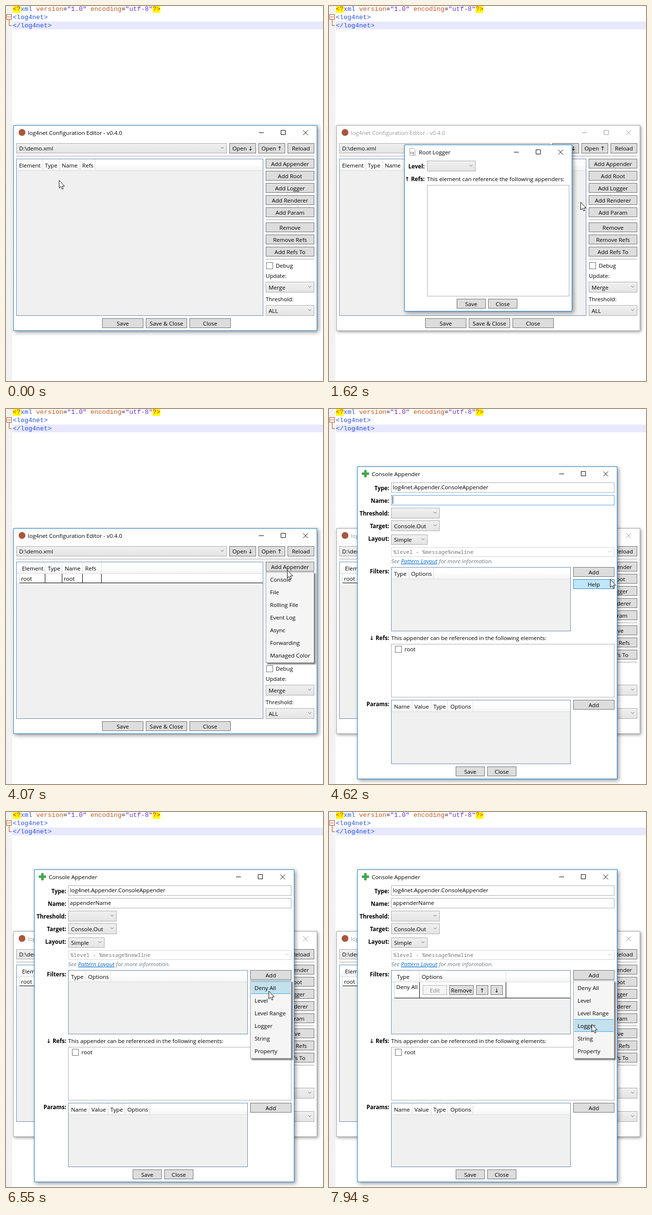
Animation, 653 px wide and 771 px high, one loop 8 s. Source, as an HTML page:

```html
<!DOCTYPE html>
<html lang="en">
<head>
<meta charset="utf-8">
<title>log4net Configuration Editor</title>
<style>
  html, body { margin: 0; width: 100%; height: 100%; overflow: hidden; background: #fff; }
  svg { display: block; width: 100vw; height: 100vh; }
  text { font: 11.6px 'Open Sans', 'Noto Sans', 'DejaVu Sans', sans-serif; fill: #000; white-space: pre; }
  .bold { font-weight: 700; text-anchor: end; }
  .mid { text-anchor: middle; }
  .code { font: 13.333px 'Liberation Mono', 'Courier New', monospace; }
  .mono { font: 11px 'Noto Sans Mono', 'DejaVu Sans Mono', monospace; fill: #7c7c7c; }
  .hint { font-style: italic; fill: #6c7b84; }
  .link { fill: #0066cc; text-decoration: underline; }
  .frame { fill: #fff; stroke: #1a7fc9; filter: drop-shadow(3px 3px 4px rgba(0,0,0,.42)); }
  .chrome { fill: none; stroke: #000; }
  .inactive > .frame { stroke: #a5a5a5; filter: drop-shadow(2px 2px 3px rgba(0,0,0,.4)); }
  .inactive > .chrome { stroke: #999; }
  .inactive > .title { fill: #999; }
  .btn rect { fill: #ddd; stroke: #707070; }
  .btn.hot rect { fill: #bee6fd; stroke: #3c7fb1; }
  .btn.off rect { fill: #f4f4f4; stroke: #adb2b5; }
  .btn.off text { fill: #838383; }
  .field { fill: #fff; stroke: #abadb3; }
  .field.focus { stroke: #569de5; }
  .menu { fill: #f5f5f5; stroke: #999; filter: drop-shadow(3px 3px 1px rgba(0,0,0,.5)); }
</style>
</head>
<body>
<svg id="stage" viewBox="0 0 653 771" preserveAspectRatio="none"></svg>
<script>
const BLACK = '#000';

// Drawing helpers
const fill = (x, y, w, h, color, extra = '') =>
  `<rect x="${x}" y="${y}" width="${w}" height="${h}" fill="${color}" ${extra}/>`;
const box = (x, y, w, h, attrs) =>
  `<rect x="${x + .5}" y="${y + .5}" width="${w - 1}" height="${h - 1}" ${attrs}/>`;
const text = (x, y, s, cls = '', extra = '') =>
  `<text x="${x}" y="${y}" class="${cls}" ${extra}>${s}</text>`;
const path = (d, color, extra = '') => `<path d="${d}" fill="none" stroke="${color}" ${extra}/>`;
const hline = (x1, x2, y, color = '#a0a0a0') => fill(x1, y, x2 - x1, 1, color);
const vline = (x, y1, y2, color) => fill(x, y1, 1, y2 - y1, color);
const group = (id, body, shown = true) =>
  `<g id="${id}"${shown ? '' : ' visibility="hidden"'}>${body}</g>`;

const button = (x, y, w, label, h = 20, cls = '') =>
  `<g class="btn ${cls}" data-box="${x},${y},${w},${h}">${box(x, y, w, h, '')}` +
  text(x + w / 2, y + 15, label, 'mid') + '</g>';

const chevron = (x, y, color = '#606060') => path(`M${x - 3} ${y - 1.5}l3 3l3 -3`, color);

const combo = (x, y, w, label = '', h = 22) =>
  box(x, y, w, h, 'fill="url(#combo)" stroke="#acacac"') +
  text(x + 6, y + 16 - (h < 22), label) + chevron(x + w - 9.5, y + h / 2 - 1);

const checkbox = (x, y, label) =>
  box(x, y, 14, 14, 'fill="#fff" stroke="#707070"') + text(x + 19.5, y + 11, label);

const gridBox = (x, y, w, h) =>
  box(x, y, w, h, 'fill="#f0f0f0" stroke="#688caf"') +
  fill(x + 1, y + 1, w - 2, 23, 'url(#head)') + hline(x + 1, x + w - 1, y + 24, '#dcdcdc');

// cols: [label, text x, separator x]
const header = (y, cols) => cols.map(([s, tx, sx]) =>
  text(tx, y + 18, s) + vline(sx, y + 1, y + 24, '#dedede')).join('');

const row = (x1, x2, y, h, lines) =>
  fill(x1, y, x2 - x1, h, '#fff') + hline(x1 + 6, x2, y + h - 1, BLACK) +
  vline(x1 + 5, y, y + h, '#d0d0d0') +
  lines.map(x => vline(x, y, y + h, BLACK)).join('');

const win = (id, x, y, w, h, title, icon, body) => {
  const r = x + w, cy = y + 15.5;
  return group(id,
    box(x, y, w, h, 'class="frame"') + icon + text(x + 30, y + 20, title, 'title') +
    `<path class="chrome" d="M${r - 120} ${cy}h10M${r - 74.5} ${cy - 5}h9v9h-9z` +
    `M${r - 29} ${cy - 5}l10 10m0 -10l-10 10"/>` + body);
};

const menu = (id, x, y, w, items) => group(id,
  box(x, y, w, items.length * 26 + 5, 'class="menu"') +
  group(id + 'Hot', fill(x + 2, y + 2, w - 4, 26, '#c3e0ee') +
    hline(x + 2, x + w - 2, y + 2, '#45a9d9') + hline(x + 2, x + w - 2, y + 27, '#45a9d9')) +
  items.map((s, i) => text(x + 9, y + 20 + 26 * i, s)).join(''), false);

const span = (s, color) => `<tspan fill="${color}">${s}</tspan>`;

// Scene
const defs = `<defs>
  <linearGradient id="combo" x2="0" y2="1"><stop stop-color="#f0f0f0"/><stop offset="1" stop-color="#e4e4e4"/></linearGradient>
  <linearGradient id="head" x2="0" y2="1"><stop offset=".4" stop-color="#fff"/><stop offset="1" stop-color="#f4f4f5"/></linearGradient>
  <pattern id="margin" width="2" height="2" patternUnits="userSpaceOnUse">
    <rect width="2" height="2" fill="#fff"/><path d="M0 0h1v1h1v1h-1v-1h-1z" fill="#e6e6e6"/></pattern>
</defs>`;

const blue = '#2450e0', orange = '#c4551c', purple = '#6a30d4', fold = '#b8501c';
const editor =
  fill(0, 0, 653, 771, '#fff') + fill(0, 0, 13, 771, 'url(#margin)') +
  fill(14, 32, 639, 16, '#e8e8ff') + fill(14, 0, 16, 14, '#ff0') + fill(302, 0, 16, 14, '#ff0') +
  text(14, 10, span('&lt;?', '#e02000') + span('xml', blue) + span(' version', orange) + '=' +
    span('"1.0"', purple) + span(' encoding', orange) + '=' + span('"utf-8"', purple) +
    span('?&gt;', '#e02000'), 'code') +
  text(14, 27, '&lt;log4net&gt;', 'code', `style="fill:${blue}"`) +
  text(14, 44, '&lt;/log4net&gt;', 'code', `style="fill:${blue}"`) +
  box(1, 17, 11, 11, `fill="#fff" stroke="${fold}"`) +
  path('M3 22.5h7M6.5 28v12.500h6', fold);

const sideButtons = [['Add Appender', 314], ['Add Root', 339], ['Add Logger', 364],
  ['Add Renderer', 389], ['Add Param', 414], ['Remove', 445], ['Remove Refs', 470], ['Add Refs To', 495]];

const mainWindow = win('main', 15, 245, 626, 423, 'log4net Configuration Editor - v0.4.0',
  '<circle cx="33" cy="260" r="7" fill="#a9573c"/>',
  combo(21, 282, 434, 'D:\\demo.xml', 21) +
  button(460, 282, 55, 'Open ↓', 21) + button(520, 282, 55, 'Open ↑', 21) +
  button(580, 282, 55, 'Reload', 21) + hline(21, 635, 308) +
  gridBox(21, 314, 509, 323) +
  group('mainEmpty', header(314,
    [['Element', 27, 75], ['Type', 80, 110], ['Name', 115, 152], ['Refs', 157, 183]])) +
  group('mainRow', header(314,
    [['Element', 33, 80], ['Type', 86, 115], ['Name', 121, 157], ['Refs', 163, 196]]) +
    row(22, 529, 339, 19, [80, 115, 157, 196]) + text(31, 353, 'root') + text(119, 353, 'root'), false) +
  sideButtons.map(([s, y]) => button(535, y, 100, s)).join('') +
  hline(535, 635, 439) + hline(535, 635, 520) + checkbox(536, 527, 'Debug') +
  text(535, 559, 'Update:') + combo(535, 567, 100, 'Merge') +
  text(535, 607, 'Threshold:') + combo(535, 615, 100, 'ALL') +
  button(198, 642, 85, 'Save') + button(288, 642, 85, 'Save &amp; Close') + button(378, 642, 85, 'Close'));

const pageIcon = path('M166.500 292.500h8l3 3v12h-11z', '#a8a8a8') + text(166, 304, 'log', '', 'style="font-size:7px;fill:#555"');

const rootWindow = win('root', 155, 285, 346, 343, 'Root Logger', pageIcon,
  text(197, 334, 'Level:', 'bold') + combo(202, 318, 100) +
  text(197, 360, '↑ Refs:', 'bold') +
  text(202, 360, 'This element can reference the following appenders:') +
  box(202, 368, 293, 229, 'class="field"') +
  button(263, 602, 60, 'Save') + button(328, 602, 60, 'Close'));

const labels = [['Type:', 167], ['Name:', 193], ['Threshold:', 219], ['Target:', 245],
  ['Layout:', 271], ['Filters:', 338], ['↓ Refs:', 475], ['Params:', 611]];

const plusIcon = '<path d="M73 126h4v5h5v4h-5v5h-4v-5h-5v-4h5z" fill="#3fae49" stroke="#2c8a38" stroke-width=".8"/>';

const consoleWindow = win('console', 58, 118, 536, 643, 'Console Appender', plusIcon,
  labels.map(([s, y]) => text(124, y, s, 'bold')).join('') +
  box(128, 151, 460, 21, 'class="field"') + text(131.5, 165, 'log4net.Appender.ConsoleAppender') +
  box(128, 177, 460, 21, 'class="field" id="nameField"') +
  group('nameText', text(131.5, 191, 'appenderName'), false) +
  group('caret', vline(131, 179, 195, BLACK)) +
  combo(128, 203, 100) + combo(128, 229, 100, 'Console.Out') + combo(128, 258, 75, 'Simple', 21) +
  box(128, 284, 460, 20, 'fill="#fff" stroke="#d5d5d5"') +
  text(132.500, 298, '%level - %message%newline', 'mono') + chevron(578.5, 293, '#b5b5b5') +
  text(128, 317, 'See <tspan class="link">Pattern Layout</tspan> for more information.', 'hint') +
  gridBox(128, 325, 370, 132) +
  group('filterEmpty', header(325, [['Type', 134, 164], ['Options', 169, 215]])) +
  group('filterRow', header(325, [['Type', 140, 186], ['Options', 191, 364]]) +
    row(129, 497, 350, 33, [186, 364]) + text(138.5, 364, 'Deny All') +
    button(193, 356, 50, 'Edit', 20, 'off') + button(248, 356, 50, 'Remove') +
    button(303, 356, 25, '↑') + button(333, 356, 25, '↓'), false) +
  button(503, 325, 85, 'Add') + button(503, 350, 85, 'Help') +
  text(128, 475, 'This appender can be referenced in the following elements:') +
  box(128, 483, 460, 110, 'class="field"') + checkbox(136, 487, 'root') +
  gridBox(128, 598, 370, 132) +
  header(598, [['Name', 134, 171], ['Value', 176, 210], ['Type', 215, 244], ['Options', 250, 296]]) +
  button(503, 598, 85, 'Add') + button(261, 735, 60, 'Save') + button(326, 735, 60, 'Close'));

const arrow = '<path id="cursor" d="M.5 .5V16.300L4 13L6.500 18.500L9 17.500L6.700 12.200H11.500Z" fill="#fff" stroke="#111"/>';

document.getElementById('stage').innerHTML = defs + editor + mainWindow +
  menu('appenderMenu', 535, 335, 100,
    ['Console', 'File', 'Rolling File', 'Event Log', 'Async', 'Forwarding', 'Managed Color']) +
  rootWindow + consoleWindow +
  menu('filterMenu', 503, 346, 85, ['Deny All', 'Level', 'Level Range', 'Logger', 'String', 'Property']) + arrow;

const LOOP = 8000;
const bursts = [[80, 850, 11], [920, 1310, 6], [1620, 2380, 11], [2460, 3230, 11], [3310, 4070, 11],
  [4150, 4620, 7], [5250, 5250, 1], [5400, 6170, 11], [6250, 7010, 11], [7090, 7860, 11], [7940, 7940, 1]];
const ticks = [0, ...bursts.flatMap(([a, b, n]) =>
  Array.from({ length: n }, (_, i) => n > 1 ? a + (b - a) * i / (n - 1) : a))];
const snap = t => ticks.findLast(k => k <= t + 6);

// Pointer path: [time, x, y]
const track = [[0, 109, 358], [80, 114, 358], [310, 262, 357], [540, 470, 352], [850, 578, 345],
  [1610, 578, 345], [1620, 518, 403], [1850, 390, 530], [2100, 330, 583], [2380, 314, 596],
  [2460, 311, 603], [2610, 310, 604], [2765, 310, 599], [3000, 430, 480], [3230, 524, 386],
  [3460, 570, 338], [3620, 580, 324], [3920, 580, 324], [4070, 579, 331], [4230, 579, 344],
  [4310, 579, 350], [5390, 579, 350], [5630, 556, 343], [5800, 541, 337], [6170, 541, 339],
  [6550, 541, 368], [6640, 541, 368], [6930, 541, 337], [7170, 541, 337], [7860, 541, 433], [7940, 541, 436]];

function pointer(t) {
  const i = track.findLastIndex(k => k[0] <= t), a = track[i], b = track[i + 1] || a;
  const p = b === a ? 0 : (t - a[0]) / (b[0] - a[0]);
  return [1, 2].map(k => Math.round(a[k] + (b[k] - a[k]) * p));
}

const $ = id => document.getElementById(id);
const within = (t, a, b) => t >= a && t < b;
const ramp = (t, a, b) => Math.min(1, Math.max(0, (t - a) / (b - a)));
const show = (id, on) => $(id).setAttribute('visibility', on ? 'inherit' : 'hidden');

function fadeWindow(id, cx, cy, amount) {
  const s = .92 + .08 * amount;
  show(id, amount > 0);
  $(id).setAttribute('opacity', amount);
  $(id).setAttribute('transform', `translate(${cx} ${cy}) scale(${s}) translate(${-cx} ${-cy})`);
}

function openMenu(id, top, count, open, y) {
  const i = Math.floor((y - top - 2) / 26);
  show(id, open);
  show(id + 'Hot', open && i >= 0 && i < count);
  $(id + 'Hot').setAttribute('transform', `translate(0 ${i * 26})`);
}

const buttons = [...document.querySelectorAll('.btn:not(.off)')].map(el => ({
  el, owner: el.closest('#main, #root, #console').id, box: el.dataset.box.split(',').map(Number)
}));

function render(now) {
  const t = snap(now % LOOP), [x, y] = pointer(t);
  const rootOpen = within(t, 990, 2610), consoleOpen = t >= 4380;
  const top = rootOpen ? 'root' : consoleOpen ? 'console' : 'main';
  const appenderOpen = within(t, 3690, 4380);
  const filterOpen = within(t, 6010, 6700) || t >= 7160;

  $('cursor').setAttribute('transform', `translate(${x} ${y})`);
  $('main').classList.toggle('inactive', top !== 'main');
  fadeWindow('root', 328, 456, ramp(t, 920, 1150) * (1 - ramp(t, 2540, 2690)));
  fadeWindow('console', 326, 440, ramp(t, 4310, 4540));

  show('mainEmpty', t < 2610);
  show('mainRow', t >= 2610);
  openMenu('appenderMenu', 335, 7, appenderOpen, y);
  openMenu('filterMenu', 346, 6, filterOpen, y);

  const named = t >= 5400, filtered = t >= 6700, focused = t < 5930;
  $('nameField').classList.toggle('focus', focused);
  show('nameText', named);
  show('caret', t < 5250 || named && focused);
  $('caret').setAttribute('transform', `translate(${named ? 83 : 0} 0)`);
  show('filterEmpty', !filtered);
  show('filterRow', filtered);

  const free = !appenderOpen && !filterOpen;
  for (const { el, owner, box: [bx, by, w, h] } of buttons)
    el.classList.toggle('hot', free && owner === top && within(x, bx, bx + w) && within(y, by, by + h));
}

const start = performance.now();
function loop() {
  render(performance.now() - start);
  requestAnimationFrame(loop);
}
loop();
</script>
</body>
</html>
```
